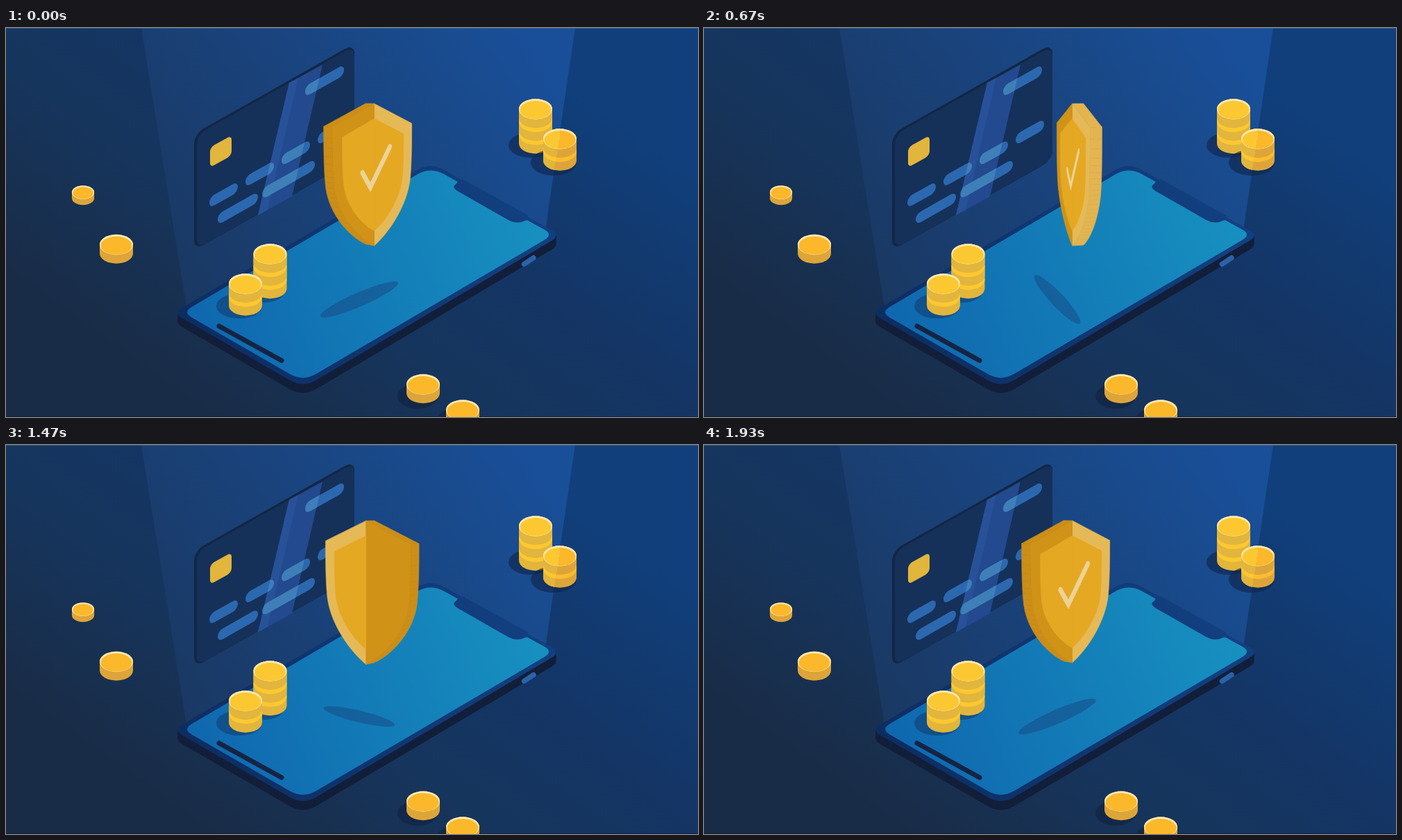
Recreate the animation shown at these times as an HTML page with a canvas. Size 997 px wide and 561 px high, loop 1.99 s.

```html
<!DOCTYPE html>
<html lang="en">
<head>
<meta charset="utf-8">
<title>Secure payment</title>
<style>
html, body { margin: 0; width: 100%; height: 100%; overflow: hidden; background: #16335c; }
canvas { display: block; width: 997px; height: 561px; }
</style>
</head>
<body>
<canvas id="stage" width="997" height="561"></canvas>
<script>
const W = 997, H = 561, LOOP = 1990, STEP = 200 / 3;
const ctx = document.getElementById('stage').getContext('2d');
const still = document.createElement('canvas');
still.width = W;
still.height = H;
let g = still.getContext('2d');

function blend(x0, y0, x1, y1, ...stops) {
  const grad = g.createLinearGradient(x0, y0, x1, y1);
  for (const [at, color] of stops) grad.addColorStop(at, color);
  return grad;
}

function trace(points) {
  g.beginPath();
  points.forEach(([x, y], i) => i ? g.lineTo(x, y) : g.moveTo(x, y));
  g.closePath();
}

function poly(points, color) {
  trace(points);
  g.fillStyle = color;
  g.fill();
}

function oval(x, y, rx, ry, color, turn = 0) {
  g.beginPath();
  g.ellipse(x, y, rx, ry, turn, 0, 7);
  g.fillStyle = color;
  g.fill();
}

function line(x0, y0, x1, y1, width, color) {
  g.beginPath();
  g.moveTo(x0, y0);
  g.lineTo(x1, y1);
  g.lineCap = 'round';
  g.lineWidth = width;
  g.strokeStyle = color;
  g.stroke();
}

function clipped(points, draw) {
  g.save();
  trace(points);
  g.clip();
  draw();
  g.restore();
}

// ---------- still scene ----------
const BEAM = [[195, 0], [820, 0], [777, 292], [430, 505], [260, 403]];

function backdrop() {
  g.fillStyle = blend(300, 561, 700, 0,
    [0, '#192c47'], [0.35, '#16355d'], [0.62, '#143565'], [1, '#103f7b']);
  g.fillRect(0, 0, W, H);
  poly(BEAM, blend(230, 400, 760, 30, [0, '#1a3760'], [1, '#194f98']));
  g.fillStyle = 'rgba(70,120,150,.5)';
  g.fillRect(0, 0, W, 1);
  g.fillStyle = 'rgba(5,15,30,.5)';
  g.fillRect(0, H - 1, W, 1);
}

// Rounded box on the upright isometric plane, centred on x, y
function tile(x, y, w, h, r, color) {
  g.save();
  g.transform(1, -0.565, 0, 1, x, y);
  g.beginPath();
  g.roundRect(-w / 2, -h / 2, w, h, r);
  g.fillStyle = color;
  g.fill();
  g.restore();
}

function card() {
  const pills = [
    [459, 76, 56], [313.5, 240.5, 41], [365.5, 210.5, 41], [417.5, 180, 41],
    [469.5, 150, 41], [334, 260, 58], [407, 218, 76]
  ];
  const drawPills = color => pills.forEach(([x, y, w]) => tile(x, y, w, 15.5, 7.5, color));
  tile(386.5, 171.5, 231, 168, 14, '#122745');
  tile(388.5, 172, 227, 164, 13, '#15315a');
  const stripe = [[408, 79], [456, 53], [412, 243], [363, 270]];
  poly(stripe, '#23498f');
  poly([[408, 79], [421, 72], [377, 262], [363, 270]], '#27529a');
  drawPills('#2c68b0');
  clipped(stripe, () => drawPills('#3f7fb8'));
  tile(309.5, 178, 31, 29, 6, '#e2b53c');
}

// Four corners left, bottom, right, top with softened tips
function slab(corners, dy = 0) {
  const cut = [13, 19, 13, 19];
  const toward = (a, b, dx) => {
    const k = dx / Math.abs(b[0] - a[0]);
    return [a[0] + (b[0] - a[0]) * k, a[1] + (b[1] - a[1]) * k + dy];
  };
  g.beginPath();
  corners.forEach((c, i) => {
    const from = toward(c, corners[(i + 3) % 4], cut[i]);
    const to = toward(c, corners[(i + 1) % 4], cut[i]);
    if (i) g.lineTo(...from); else g.moveTo(...from);
    g.quadraticCurveTo(c[0], c[1] + dy, ...to);
  });
  g.closePath();
}

function phone() {
  const body = [[241, 411], [428, 519], [799, 299], [611.4, 193.5]];
  const glass = [[254.6, 410], [427.9, 510], [788.6, 298], [611.4, 200]];
  const rim = blend(260, 450, 720, 230, [0, '#0c2d61'], [1, '#123f80']);
  g.fillStyle = '#121f3a';
  for (let dy = 13; dy > 0; dy--) {
    slab(body, dy);
    g.fill();
  }
  slab(body);
  g.fillStyle = rim;
  g.fill();
  slab(glass);
  g.fillStyle = blend(260, 450, 760, 230, [0, '#0f66ae'], [1, '#1791c0']);
  g.fill();
  g.beginPath();
  g.moveTo(651, 221);
  g.quadraticCurveTo(650, 224, 647, 226);
  g.quadraticCurveTo(642, 230, 652, 236);
  g.lineTo(722, 276);
  g.quadraticCurveTo(736, 284, 747, 278);
  g.lineTo(752, 277);
  g.lineTo(752, 270);
  g.lineTo(658, 218);
  g.fillStyle = rim;
  g.fill();
  line(307, 430, 397, 479.5, 7, '#142444');
  line(746.5, 340.5, 760, 331.5, 7.5, '#2a62a8');
}

const PLAIN = { top: '#fbb82a', side: '#dda539', band: '#fbbd2e' };
const LIT = { top: '#fcc832', side: '#e2b53c', band: '#fcc832' };

function drum(x, y, rx, ry, h, color) {
  g.beginPath();
  g.ellipse(x, y, rx, ry, 0, Math.PI, 0);
  g.lineTo(x + rx, y + h);
  g.ellipse(x, y + h, rx, ry, 0, 0, Math.PI);
  g.closePath();
  g.fillStyle = color;
  g.fill();
}

function coins(x, y, count, ink, size = 1) {
  const rx = 24 * size, ry = 14.7 * size, gap = 18.5;
  for (let i = count - 1; i >= 0; i--) {
    const top = y + i * gap;
    if (i < count - 1) drum(x, top, rx, ry, gap, ink.band);
    drum(x, top, rx, ry, 12.5 * size, ink.side);
  }
  oval(x, y, rx, ry, '#fdeab8');
  oval(x, y + 1.2 * size, rx - 1.5, ry - 1.6 * size, ink.top);
}

function money() {
  const dark = 'rgba(16,36,72,.6)', wet = 'rgba(18,62,116,.6)';
  coins(111, 237, 1, PLAIN, 0.67);
  coins(159, 312.5, 1, PLAIN);
  oval(372, 378, 30, 18, wet);
  coins(380.5, 326, 3, LIT);
  oval(336, 401, 33, 18, wet);
  coins(345, 369, 2, LIT);
  oval(755, 169, 31, 18, dark);
  coins(763, 117, 3, LIT);
  oval(789, 194, 33, 19, dark);
  coins(798, 160, 2, PLAIN);
  clipped(BEAM, () => coins(798, 160, 2, LIT));
  oval(593, 531, 29, 18, 'rgba(18,34,64,.6)');
  coins(601, 514, 1, PLAIN);
  oval(650, 566, 29, 18, 'rgba(18,34,64,.6)');
  coins(658, 551, 1, PLAIN);
}

// ---------- turning shield ----------
const AXIS = 530.5, MID = 212, THICK = 17;
const TILT = 0.105, DEPTH = 0.0009, INNER = 0.77;
const TONE = {
  dark: '#d09217', darkWall: '#cc8e17',
  light: '#e6b957', lightWall: '#e3b450',
  panel: '#e5a823', tick: '#ecd396'
};

function cubic(a, b, c, d, n) {
  return Array.from({ length: n }, (_, i) => {
    const t = (i + 1) / n, u = 1 - t;
    return [0, 1].map(k =>
      u * u * u * a[k] + 3 * u * u * t * b[k] + 3 * u * t * t * c[k] + t * t * t * d[k]);
  });
}

// Half outline from the tip round the shoulder to the point
const HALF = [
  [0, -103], [84, -72],
  ...cubic([84, -72], [84, -27], [83, -7], [80, 13], 8),
  ...cubic([80, 13], [73, 50], [36, 85], [0, 102], 16)
];

function project(x, y, z, a) {
  const near = z * Math.cos(a) - x * Math.sin(a);
  const s = 1 + near * DEPTH;
  return [AXIS + (x * Math.cos(a) + z * Math.sin(a)) * s, MID + y * s + near * TILT];
}

function half(side, z, a, kx = 1, ky = 1) {
  return HALF.map(([x, y]) => project(x * side * kx, y * ky, z, a));
}

function face(points, color) {
  poly(points, color);
  g.lineWidth = 0.6;
  g.lineJoin = 'round';
  g.strokeStyle = color;
  g.stroke();
}

function area(p) {
  return p.reduce((sum, [x, y], i) => {
    const [u, v] = p[(i + 1) % p.length];
    return sum + x * v - u * y;
  }, 0);
}

function shield(a) {
  for (const side of [-1, 1]) {
    const front = half(side, 0, a), back = half(side, -THICK, a);
    for (let i = 1; i < front.length; i++) {
      const wall = [front[i - 1], front[i], back[i], back[i - 1]];
      if (area(wall) * side < 0) face(wall, side < 0 ? TONE.darkWall : TONE.lightWall);
    }
  }
  const facing = Math.cos(a) > 0, z = facing ? 0 : -THICK;
  face(half(1, z, a), TONE.light);
  face(half(-1, z, a), TONE.dark);
  face(half(1, z, a, INNER, 0.79), TONE.panel);
  if (!facing) return;
  face(half(-1, z, a, INNER, 0.79), TONE.panel);
  g.save();
  g.transform(Math.cos(a), -Math.sin(a) * TILT, 0, 1, AXIS, MID);
  g.beginPath();
  g.moveTo(-25, -5);
  g.lineTo(-8, 17);
  g.lineTo(33, -38);
  g.lineCap = 'round';
  g.lineJoin = 'miter';
  g.lineWidth = 8.5;
  g.strokeStyle = TONE.tick;
  g.stroke();
  g.restore();
}

// step, shield turn, shadow turn on the floor, shadow half length, half width
const POSES = [
  [0, 47, 44, 61, 10],
  [7, -38, -28, 52.5, 8.5],
  [13, -109, -106.3, 43, 11],
  [18, -175, -161.6, 60, 10.5],
  [22, -223, -208, 52.5, 8.5],
  [27, -288, -284, 39.5, 9],
  [29, -313, -316, 60.5, 10]
];

function poseAt(n) {
  const i = Math.max(1, POSES.findIndex(p => p[0] >= n));
  const a = POSES[i - 1], b = POSES[i], k = (n - a[0]) / (b[0] - a[0]);
  return a.map((v, j) => v + (b[j] - v) * k);
}

function shadow(turn, length, width) {
  const r = turn * Math.PI / 180;
  const tilt = Math.atan2(0.45 * Math.sin(r), Math.cos(r));
  oval(509, 391.5, length, width, 'rgba(22,72,132,.5)', -tilt);
}

backdrop();
card();
phone();
money();
g = ctx;

function frame(now) {
  const step = Math.min(29, Math.floor(now % LOOP / STEP + 0.06));
  const [, turn, floorTurn, length, width] = poseAt(step);
  g.drawImage(still, 0, 0);
  shadow(floorTurn, length, width);
  shield(turn * Math.PI / 180);
}

let start;
function tick(now) {
  start ??= now;
  frame(Math.max(0, now - start));
  requestAnimationFrame(tick);
}
frame(0);
requestAnimationFrame(tick);
</script>
</body>
</html>
```
